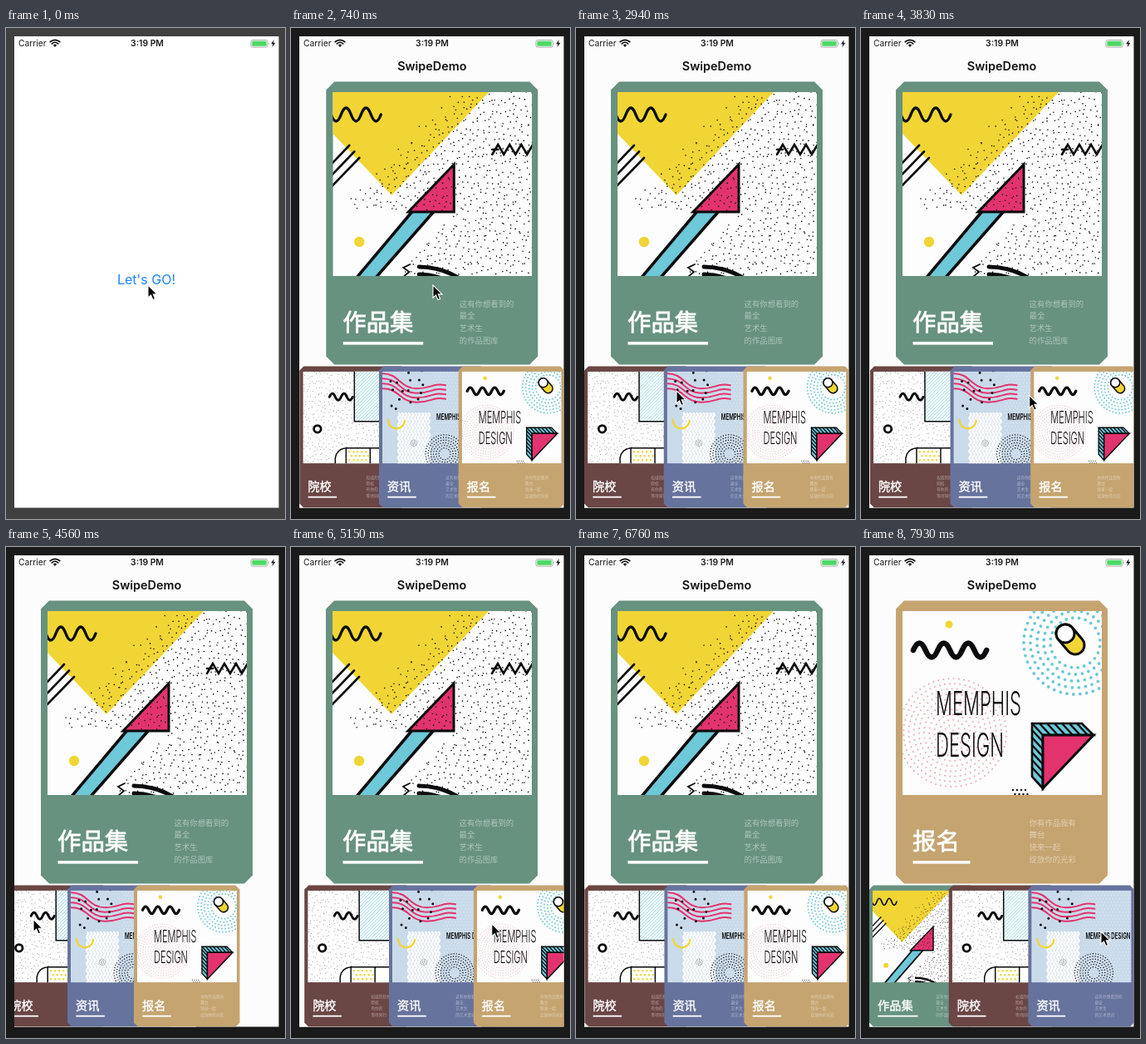
An HTML page for the animation above (8 s loop, 336 by 590 pixels).

```html
<!DOCTYPE html>
<html lang="en">
<head>
<meta charset="utf-8">
<title>Swipe cards</title>
<style>
  html, body { margin: 0; width: 100%; height: 100%; overflow: hidden; background: #1a1a1a; }
  svg { display: block; width: 100vw; height: 100vh; }
  text { font-family: Inter, Roboto, sans-serif; }
  .cjk { font-family: 'Noto Sans CJK SC', 'Noto Sans CJK', sans-serif; fill: #fff; }
  .name { font-size: 28.4px; stroke: #fff; stroke-width: .8px; }
  .desc { font-size: 9.4px; opacity: .47; }
  .line, .dots { fill: none; stroke-linecap: round; }
</style>
</head>
<body>
<svg id="stage" viewBox="0 0 336 590"></svg>
<script>
const LOOP = 8000, STEP = 146.8;
const INK = '#0b0b0d', PINK = '#e2336e', CYAN = '#6dc8d8', YELLOW = '#f1d535';

// ---- drawing helpers ----
let seed = 7;
const rand = () => (seed = (seed * 16807) % 2147483647) / 2147483647;
const range = (n, f) => Array.from({ length: n }, (_, i) => f(i));
const each = (n, f) => range(n, f).join('');
const line = (d, w, color = INK) =>
  `<path class="line" d="${d}" stroke="${color}" stroke-width="${w}"/>`;
const poly = (pts, fill, w = 0) =>
  `<polygon points="${pts}" fill="${fill}" stroke="${INK}" stroke-width="${w}"/>`;
const disc = (x, y, r, fill, w = 0) =>
  `<circle cx="${x}" cy="${y}" r="${r}" fill="${fill}" stroke="${INK}" stroke-width="${w}"/>`;
const rect = (x, y, w, h, fill) =>
  `<rect x="${x}" y="${y}" width="${w}" height="${h}" fill="${fill}"/>`;
const dots = (pts, size, color) =>
  `<path class="dots" stroke="${color}" stroke-width="${size}" d="${
    pts.map(([x, y]) => `M${x.toFixed(1)} ${y.toFixed(1)}h.01`).join('')}"/>`;
// n half waves, each w wide and h high
const wave = (x, y, w, h, n) => `M${x} ${y}q${w / 2} ${-2 * h} ${w} 0` + `t${w} 0`.repeat(n - 1);
const grid = (x, y, cols, rows, gap) =>
  range(cols * rows, i => {
    const row = Math.floor(i / cols);
    return [x + (i % cols + row % 2 / 2) * gap, y + row * gap];
  });
const speckle = (gap, keep = () => true) =>
  grid(0, 0, Math.ceil(240 / gap), Math.ceil(221 / gap), gap)
    .map(p => p.map(v => v + (rand() - .5) * gap * .9))
    .filter(keep);
const rings = (x, y, from, to, gap) => {
  const pts = [];
  for (let r = from; r <= to; r += gap) {
    const n = Math.max(1, Math.round(2 * Math.PI * r / gap));
    for (let i = 0; i < n; i++) {
      const a = 2 * Math.PI * i / n + r;
      pts.push([x + r * Math.cos(a), y + r * Math.sin(a)]);
    }
  }
  return pts;
};
const lettering = (x, y, size, weight, s) =>
  `<text transform="translate(${x} ${y}) scale(.56 1)" font-size="${size}" font-weight="${weight}" fill="${INK}">${s}</text>`;

// ---- card pictures, 240 x 221 ----
const portfolioArt = () =>
  poly('0,0 188,0 71,124 0,50', YELLOW) +
  line(wave(-2, 27, 12, -8, 5), 3.4) +
  line(each(3, i => `M-2 ${87 + i * 13.5}l${22 + i * 6} ${-23 - i * 6}`), 2.6) +
  poly('30,221 54,221 122,144 96,144', CYAN) +
  line('M27 225L97 142M50 225L123 142', 3.6) +
  poly('146,87 146,144 91,144', PINK, 3) +
  dots(speckle(7.2, ([x, y]) => x + y > 142 + rand() * 25 && (x > 146 - (y - 144) * .88 || y < 142)), 1.6, INK) +
  line(wave(192, 69, 7, 0, 1) + each(7, i => `l7 ${i % 2 ? 12 : -12}`).replace('l7 -12', 'm-7 6l7 -12'), 2.6) +
  disc(32, 180, 6.2, YELLOW) +
  line('M93 207l-8 4l7 5l-7 6', 1.8) +
  line('M104 210A95 95 0 0 1 165 233M104 219A86 86 0 0 1 155 237', 5);

const schoolArt = () =>
  dots(speckle(10), 1.5, '#666') +
  line(wave(64, 61, 14, 8, 4), 6) +
  rect(124, -4, 130, 124, '#fff') +
  `<g clip-path="url(#hatch)">${line(each(34, i => `M124 ${8 + i * 8}l130 -130`), 1.4, CYAN)}</g>` +
  line('M124 -4V120H254', 3) +
  disc(35, 138, 8.5, '#fff', 5.5) +
  `<path d="M78 225V206Q80 186 104 184H254V225Z" fill="#fff"/>` +
  dots(grid(112, 193, 5, 3, 10), 5, YELLOW) +
  line('M78 225V208Q82 186 104 184H254M104 184V225M162 184V225', 3);

const newsArt = () =>
  rect(0, 0, 240, 221, '#c9daea') +
  dots(grid(124, 4, 15, 28, 8), 2.4, '#eef4fa') +
  rect(38, 100, 74, 121, '#dfe9f3') +
  line(each(10, i => `M${40 + i * 8} 100` + 'q5 4 0 8t0 8'.repeat(8)), 4, '#fff') +
  line(each(4, i => `M-2 ${5 + i * 12}c42 -2 44 ${36 - i} 84 ${36 - i}s36 -14 70 -8`), 4, PINK) +
  dots(speckle(24, ([x, y]) => x < 100 && y < 110 - x * .3 && x > 4), 6, INK) +
  line('M14 116A20 20 0 0 0 54 118', 4.5, YELLOW) +
  dots(rings(76, 172, 0, 9, 3.8), 1.6, '#555') +
  dots(rings(150, 198, 14, 46, 6.4), 2.8, INK) +
  lettering(130, 116, 22, 600, 'MEMPHIS DESIGN');

const signupArt = () =>
  dots(rings(60, 146, 3, 70, 6.2), 2, '#f0a3b4') +
  dots(rings(208, 38, 30, 64, 8), 3.8, CYAN) +
  disc(56, 16, 4.5, YELLOW) +
  line(wave(13, 47, 14.7, 8.5, 6), 6.5) +
  line('M196 27L208 41', 25) +
  line('M196 27L208 41', 19, YELLOW) +
  disc(196, 27, 11, '#fff', 3) +
  lettering(40, 125, 39.5, 300, 'MEMPHIS') +
  lettering(40, 175, 39.5, 300, 'DESIGN') +
  poly('169,213 156,199 156,135 216,135 230,149 169,149', CYAN, 2.6) +
  line(each(7, i => `M${156 + i * 9} 135l13 14`) + each(6, i => `M156 ${143 + i * 9}l13 14`), 2.4) +
  poly('169,149 230,149 169,213', PINK, 3) +
  dots(grid(133, 215, 4, 2, 5), 2.4, INK);

// ---- cards, 255 x 340 ----
const CARDS = [
  ['作品集', '#67927f', portfolioArt, ['这有你想看到的', '最全', '艺术生', '的作品图库']],
  ['院校', '#6a4645', schoolArt, ['权威的院校库', '院校', '有你的', '等待同行']],
  ['资讯', '#66739d', newsArt, ['这有你想看到的', '最全', '艺术生', '的艺术资讯']],
  ['报名', '#c6a470', signupArt, ['你有作品我有', '舞台', '快来一起', '绽放你的光彩']],
];
const card = ([name, color, art, desc], i) => `<g id="card${i}">
  <path d="M10 0H245L255 10V330L245 340H10L0 330V10Z" fill="${color}"/>
  <g transform="translate(8 12.5)" clip-path="url(#picture)">${rect(0, 0, 240, 221, '#fdfdfd')}${art()}</g>
  <text class="cjk name" x="20" y="299.5">${name}</text>
  ${rect(20.5, 312.5, name.length * 27.5 + 14, 3.6, '#fff')}
  ${desc.map((s, k) => `<text class="cjk desc" x="160.5" y="${270 + k * 14.8}">${s}</text>`).join('')}
</g>`;

const stage = document.getElementById('stage');
stage.innerHTML = `
<defs>
  <clipPath id="phone">${rect(10, 10, 318.5, 566.5)}</clipPath>
  <clipPath id="picture">${rect(0, 0, 240, 221)}</clipPath>
  <clipPath id="hatch">${rect(124, 0, 116, 120)}</clipPath>
</defs>
<rect id="desk" width="336" height="590"/>
<g clip-path="url(#phone)">
  <g id="home">
    ${rect(10, 10, 319, 567, '#fff')}
    <text id="go" x="169" y="308" font-size="16" text-anchor="middle" fill="#1d86f5">Let's GO!</text>
  </g>
  <g id="deck">
    ${rect(10, 10, 319, 567, '#fcfcfc')}
    <text x="169.5" y="51" font-size="14.4" font-weight="600" text-anchor="middle" fill="#111">SwipeDemo</text>
    ${CARDS.map(card).join('')}
  </g>
  <g fill="#1b1b1b">
    <text x="15" y="22.4" font-size="10.3">Carrier</text>
    <text x="170" y="22.4" font-size="10.4" font-weight="600" text-anchor="middle">3:19 PM</text>
    <path d="M59 23l-2.2 -2.4a3.2 3.2 0 0 1 4.4 0Z"/>
    ${line('M55.3 18.9a5.4 5.4 0 0 1 7.4 0M53.2 16.6a8.4 8.4 0 0 1 11.6 0', 1.7)}
    <rect x="295" y="14.5" width="20" height="8.6" rx="2" fill="#fff" stroke="#9a9a9a" stroke-width=".8"/>
    <rect x="296.3" y="15.8" width="17.4" height="6" rx="1" fill="#4cd964"/>
    <path d="M316.2 17.3q1.4 1.5 0 3Z" fill="#9a9a9a"/>
    <path d="M322.8 14l-3.6 5.2h2.2l-.8 4l3.8 -5.4h-2.3Z"/>
  </g>
</g>
<path id="cursor" d="M0 0V15.2L3.5 11.9L6 17.6L8.6 16.5L6.2 10.9H11Z" fill="#000" stroke="#fff" stroke-width="1.1"/>`;
const el = id => document.getElementById(id);

// ---- motion ----
const clamp = u => Math.max(0, Math.min(1, u));
const progress = (t, from, to) => clamp((t - from) / (to - from));
const smooth = u => u * u * (3 - 2 * u);
const easeOut = u => 1 - (1 - u) ** 3;
const easeInOut = u => u < .5 ? 4 * u ** 3 : 1 - 4 * (1 - u) ** 3;
const mix = (a, b, u) => a.map((v, i) => v + (b[i] - v) * u);

// Sideways strokes of the pointer: start, end, distance
const STROKES = [
  [2070, 2360, -94], [2360, 2800, 51], [2940, 3400, 129], [3500, 4550, -217],
  [4640, 5000, 290], [5000, 5280, -166], [5440, 5725, 63], [6020, 6400, 90],
  [6700, 6890, -32], [7780, 7920, 11],
];
// Each swipe pulls the strip's cards apart or together, then lets them spring back
const SWIPES = [[2360, -10], [3470, 10], [4560, -16], [5000, 9], [6330, 12]];
const spread = t => SWIPES.reduce((sum, [at, size]) => sum + size * Math.exp(-(((t - at) / 225) ** 2)), 0);

function pointer(t) {
  const u = progress(t, 1030, 1750), v = progress(t, 2070, 6030);
  const x = 171 - 7 * u + 130 * (1 - .7 * u) * Math.sin(2 * Math.PI * u);
  const y = 309 + 124 * u * u - 25 * Math.sin(Math.PI * u) + 29 * v ** 1.5;
  return [STROKES.reduce((sum, [a, b, dx]) => sum + dx * smooth(progress(t, a, b)), x), y];
}

const MAIN = [42, 64.5, 1];
const slot = (i, d) => [10 + 95.7 * i + d * (i + 1), 406.5, .5];
const move = (id, x, y, s = 1) =>
  el(id).setAttribute('transform', `translate(${x} ${y}) scale(${s})`);

function draw(t) {
  const push = easeOut(progress(t, 230, 790));
  el('desk').setAttribute('fill', t < 140 ? '#404040' : '#1a1a1a');
  el('go').setAttribute('opacity', t > 140 && t < 290 ? .3 : 1);
  move('home', -100 * push, 0);
  move('deck', 319 * (1 - push), 0);

  const d = spread(t), swap = easeInOut(progress(t, 6890, 7590));
  CARDS.forEach((_, i) => {
    const from = i ? slot(i - 1, d) : MAIN;
    const to = i < 3 ? slot(i, d) : MAIN;
    move('card' + i, ...mix(from, to, swap));
  });

  move('cursor', ...pointer(t));
  el('cursor').setAttribute('visibility', t > 6700 && t < 6880 ? 'hidden' : 'visible');
}

// The screen refreshes once per STEP
const start = performance.now();
function tick(now) {
  const t = Math.max(0, now - start) % LOOP;
  draw(Math.floor((t + 5) / STEP) * STEP);
  requestAnimationFrame(tick);
}
draw(0);
requestAnimationFrame(tick);
</script>
</body>
</html>
```
